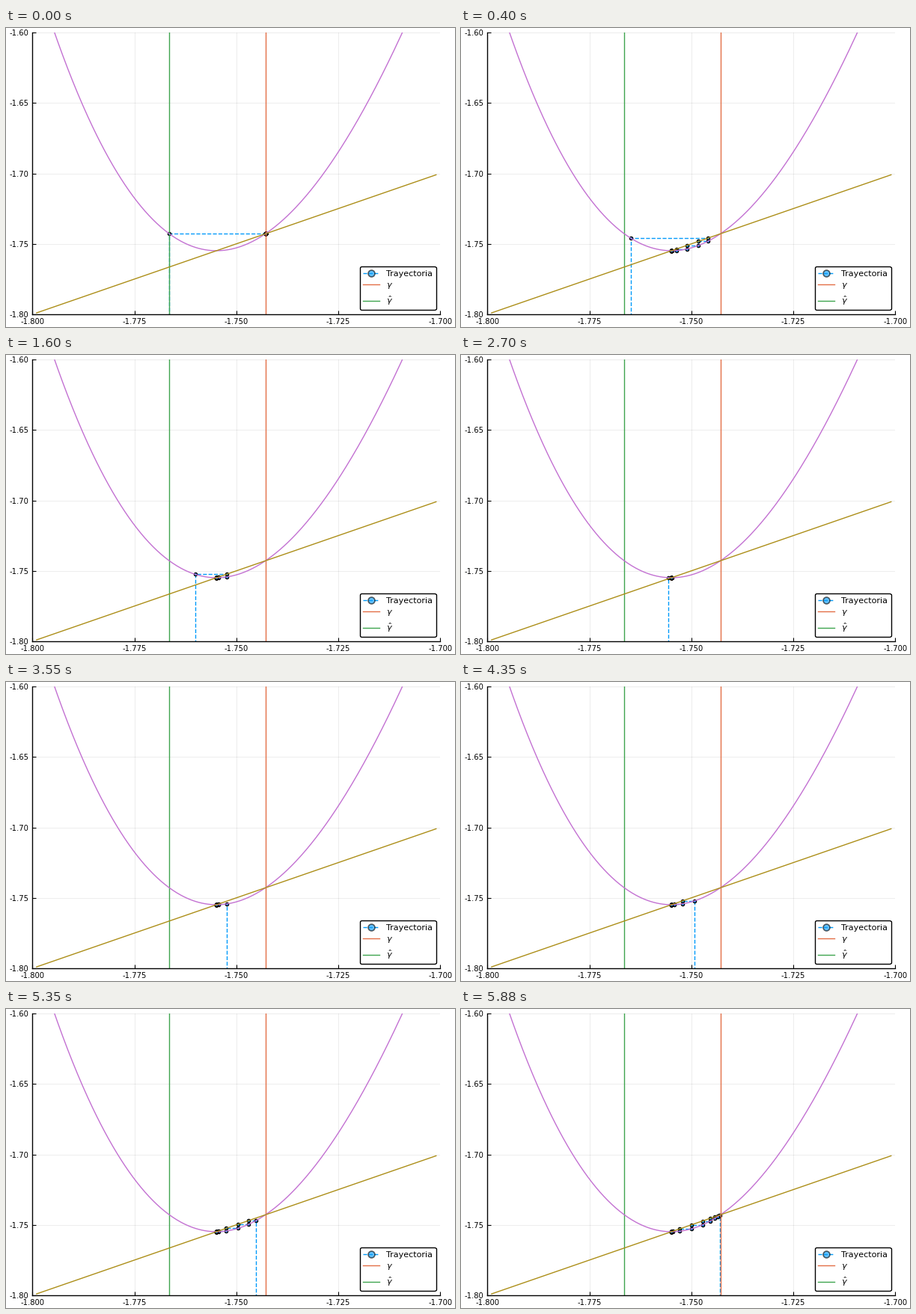
Write a matplotlib script that moves like this. It is 600x400 px and loops after 5910 ms.

```python
import numpy as np
import matplotlib.pyplot as plt
from matplotlib.animation import FuncAnimation

plt.rcParams.update({
    "font.family": "DejaVu Sans",
    "mathtext.fontset": "dejavusans",
    "axes.unicode_minus": False,
})

W, H, DPI = 600, 400, 100
FRAMES, LOOP_MS = 236, 5910
C = -1.75487
STEP = 1e-4
ITERATIONS = 20
BLUE, ORANGE, GREEN, PURPLE, GOLD = (
    "#009AFA", "#E36F47", "#3EA44E", "#C371D2", "#AC8E18")


def cubed(x):
    """Third iterate of x -> x^2 + C."""
    for _ in range(3):
        x = x * x + C
    return x


def fixed_point(lo, hi):
    """Bisect for the repelling fixed point of the third iterate."""
    for _ in range(80):
        mid = (lo + hi) / 2
        if cubed(mid) < mid:
            lo = mid
        else:
            hi = mid
    return (lo + hi) / 2


gamma = fixed_point(-1.748, -1.735)
inner = gamma ** 2 + C
mirror = -np.sqrt(np.sqrt(-(inner ** 2 + C) - C) - C)


def cobweb(x):
    """Vertices of the staircase that starts below the view at x."""
    xs, ys = [x], [-2.0]
    y = cubed(x)
    for _ in range(ITERATIONS):
        xs += [x, y]
        ys += [y, y]
        # keep the orbit on the fixed point despite rounding
        x, y = y, y if abs(y - gamma) < 1e-9 else cubed(y)
    return xs, ys


fig = plt.figure(figsize=(W / DPI, H / DPI), dpi=DPI, facecolor="white")
left, right, top, bottom = 35.4, 580.2, 6, 383
ax = fig.add_axes([left / W, 1 - bottom / H, (right - left) / W, (bottom - top) / H])
ax.set_xlim(-1.8, -1.7)
ax.set_ylim(-1.8, -1.6)
xt = np.linspace(-1.8, -1.7, 5)
yt = np.linspace(-1.8, -1.6, 5)
ax.set_xticks(xt, [f"{v:.3f}" for v in xt])
ax.set_yticks(yt, [f"{v:.2f}" for v in yt])
ax.tick_params(direction="in", labelsize=8, width=0.8, length=3.5, pad=3.5)
ax.tick_params(labelsize=7.2)
ax.set_axisbelow(True)
ax.grid(color="black", alpha=0.1, lw=0.5)
for side in ("top", "right"):
    ax.spines[side].set_visible(False)
for side in ("left", "bottom"):
    ax.spines[side].set_linewidth(1)

path, = ax.plot([], [], "--", color=BLUE, lw=1, zorder=2)
dots, = ax.plot([], [], "o", ms=3, mfc=BLUE, mec="black", mew=1, zorder=2)
line_g = ax.axvline(gamma, color=ORANGE, lw=1, zorder=2)
line_m = ax.axvline(mirror, color=GREEN, lw=1, zorder=2)
x = np.linspace(-1.799, -1.701, 400)
ax.plot(x, cubed(x), color=PURPLE, lw=1, zorder=2)
ax.plot(x, x, color=GOLD, lw=1, zorder=2)

key = plt.Line2D([], [], ls="--", color=BLUE, lw=1, marker="o", ms=6.4,
                 mfc=(0, 0.604, 0.98, 0.6), mec=(0, 0, 0, 0.6), mew=1.2)
legend = ax.legend([key, line_g, line_m],
                   ["Trayectoria", r"$\gamma$", r"$\hat{\gamma}$"],
                   loc="lower right", fontsize=8, framealpha=1,
                   edgecolor="black", facecolor="white")
legend.get_frame().set_linewidth(1)
legend.set_zorder(5)


def update(i):
    xs, ys = cobweb(mirror + i * STEP)
    path.set_data(xs, ys)
    dots.set_data(xs, ys)
    return path, dots


anim = FuncAnimation(fig, update, frames=FRAMES, interval=LOOP_MS / FRAMES,
                     repeat=True, repeat_delay=0)
plt.show()
```
